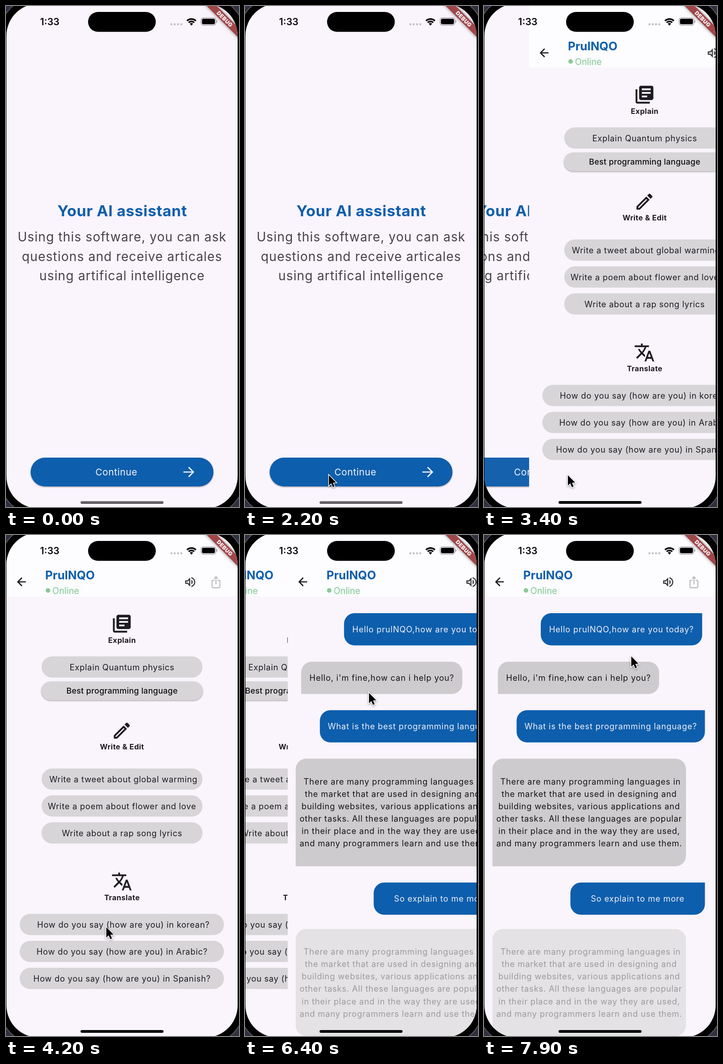
Write an HTML page with a canvas that moves like this. It is 511 px wide and 1096 px high and loops after 8 s.

```html
<!DOCTYPE html>
<html lang="en">
<head>
<meta charset="utf-8">
<title>AI assistant app</title>
<style>
html, body { margin: 0; width: 100%; height: 100%; overflow: hidden; background: #000; }
canvas { display: block; width: 511px; height: 1096px; }
</style>
</head>
<body>
<canvas id="stage"></canvas>
<script>
const W = 511, H = 1096, LOOP = 8000, PAGE_W = 508;
const BLUE = '#0d5eac', INK = '#1d1b20', BG = '#faf4fc', PILL = '#d7d5d8', BUBBLE = '#cdcbcd';
const BOT = 'PrulNQO';

const canvas = document.getElementById('stage');
const ctx = canvas.getContext('2d');
const dpr = window.devicePixelRatio || 1;
canvas.width = W * dpr;
canvas.height = H * dpr;

const icons = {
  books: 'M4 6H2v14c0 1.1.9 2 2 2h14v-2H4V6zm16-4H8c-1.1 0-2 .9-2 2v12c0 1.1.9 2 2 2h12c1.1 0 2-.9 2-2V4c0-1.1-.9-2-2-2zm-1 9H9V9h10v2zm-4 4H9v-2h6v2zm4-8H9V5h10v2z',
  edit: 'M14.06 9.02l.92.92L5.92 19H5v-.92l9.06-9.06M17.66 3c-.25 0-.51.1-.7.29l-1.83 1.83 3.75 3.75 1.83-1.83c.39-.39.39-1.02 0-1.41l-2.34-2.34c-.2-.2-.45-.29-.71-.29zm-3.6 3.19L3 17.25V21h3.75L17.81 9.94l-3.75-3.75z',
  translate: 'M12.87 15.07l-2.54-2.51.03-.03c1.74-1.94 2.98-4.17 3.71-6.53H17V4h-7V2H8v2H1v1.99h11.17C11.5 7.92 10.44 9.75 9 11.35 8.07 10.32 7.3 9.19 6.69 8h-2c.73 1.63 1.73 3.17 2.98 4.56l-5.09 5.02L4 19l5-5 3.11 3.11.76-2.04zM18.5 10h-2L12 22h2l1.12-3h4.75L21 22h2l-4.5-12zm-2.62 7l1.62-4.33L19.12 17h-3.24z',
  volume: 'M3 9v6h4l5 5V4L7 9H3zm7-.17v6.34L7.83 13H5v-2h2.83L10 8.83zM16.5 12c0-1.77-1.02-3.29-2.5-4.03v8.05c1.48-.73 2.5-2.25 2.5-4.02zM14 3.23v2.06c2.89.86 5 3.54 5 6.71s-2.11 5.85-5 6.71v2.06c4.01-.91 7-4.49 7-8.77s-2.99-7.86-7-8.77z',
  share: 'M16 5l-1.42 1.42-1.59-1.59V16h-1.98V4.83L9.42 6.42 8 5l4-4 4 4zm4 5v11c0 1.1-.9 2-2 2H6c-1.11 0-2-.9-2-2V10c0-1.11.89-2 2-2h3v2H6v11h12V10h-3V8h3c1.1 0 2 .89 2 2z'
};
for (const name in icons) icons[name] = new Path2D(icons[name]);

function cubic(x0, y0, x1, y1, x2, y2, x3, y3) {
  const at = (a, b, c, d, s) => {
    const r = 1 - s;
    return a * r * r * r + 3 * b * s * r * r + 3 * c * s * s * r + d * s * s * s;
  };
  return x => {
    let lo = 0, hi = 1;
    for (let i = 0; i < 24; i++) {
      const mid = (lo + hi) / 2;
      if (at(x0, x1, x2, x3, mid) < x) lo = mid; else hi = mid;
    }
    return at(y0, y1, y2, y3, lo);
  };
}
const fastIn = cubic(0, 0, 0.056, 0.024, 0.108, 0.3085, 0.198, 0.541);
const slowOut = cubic(0.198, 0.541, 0.3655, 1, 0.5465, 0.989, 1, 1);
const enterEase = x => x < 0.198 ? fastIn(x) : slowOut(x);
const leaveEase = cubic(0, 0, 0.35, 0.91, 0.33, 0.97, 1, 1);

function box(x, y, w, h, r, color) {
  ctx.beginPath();
  ctx.roundRect(x, y, w, h, r);
  ctx.fillStyle = color;
  ctx.fill();
}

function text(str, x, y, size, opt = {}) {
  ctx.font = `${opt.weight || 400} ${size}px Inter, Roboto, sans-serif`;
  ctx.letterSpacing = (opt.gap || 0) + 'px';
  ctx.textAlign = opt.align || 'center';
  ctx.fillStyle = opt.color || INK;
  ctx.fillText(str, x, y);
}

function line(color, width, ...pts) {
  ctx.beginPath();
  for (let i = 0; i < pts.length; i += 2) ctx.lineTo(pts[i], pts[i + 1]);
  ctx.strokeStyle = color;
  ctx.lineWidth = width;
  ctx.stroke();
}

function icon(name, x, y, scale, color) {
  ctx.save();
  ctx.translate(x, y);
  ctx.scale(scale, scale);
  ctx.translate(-12, -12);
  ctx.fillStyle = color;
  ctx.fill(icons[name], 'evenodd');
  ctx.restore();
}

function shadow(color, blur, dy) {
  ctx.shadowColor = color;
  ctx.shadowBlur = blur * dpr;
  ctx.shadowOffsetY = dy * dpr;
}
const noShadow = () => shadow('transparent', 0, 0);

function welcomePage(t) {
  text('Your AI assistant', 255, 460, 33.3, { weight: 700, gap: 0.6, color: BLUE });
  ['Using this software, you can ask', 'questions and receive articales', 'using artifical intelligence']
    .forEach((s, i) => text(s, 254.5, 515 + i * 42.5, 27.8, { gap: 1, color: '#47434b' }));
  shadow('rgba(0,0,0,.35)', 3, 1.5);
  box(54, 988, 401, 63, 31.5, t > 3150 ? '#1661ad' : BLUE);
  noShadow();
  text('Continue', 242, 1027, 20.7, { gap: 0.5, color: '#f4f4fa' });
  line('#f4f4fa', 2.7, 389, 1019.5, 411, 1019.5);
  line('#f4f4fa', 2.7, 400.5, 1009, 411, 1019.5, 400.5, 1030);
}

function header() {
  box(1, -5, PAGE_W, 140, 0, '#fdfcfe');
  line(INK, 2.6, 26, 102.5, 43.5, 102.5);
  line(INK, 2.6, 35, 93.5, 26, 102.5, 35, 111.5);
  text(BOT, 86, 97, 25.5, { weight: 700, align: 'left', color: BLUE });
  shadow('rgba(130,225,190,.35)', 9, 0);
  text('Online', 101.5, 129, 19.5, { align: 'left', color: '#8cc897' });
  noShadow();
  box(87, 116.2, 10, 10, 5, '#8cc897');
  icon('volume', 404, 103, 1.24, '#3b393f');
  icon('share', 460.5, 103, 1.22, '#c0bec3');
}

function pill(str, x, y, w, textX = 254.5) {
  box(x, y, w, 46.5, 23.25, PILL);
  text(str, textX, y + 30.5, 18.1, { gap: 0.65 });
}

function section(name, label, y, labelY) {
  icon(name, 254, y, 1.95, INK);
  text(label, 254.5, labelY, 16.2, { weight: 700, gap: 0.45 });
}

function topicsPage() {
  header();
  section('books', 'Explain', 194, 236);
  pill('Explain Quantum physics', 78, 265.5, 353);
  shadow('rgba(0,0,0,.35)', 3, 1.3);
  box(77.5, 320.5, 354, 41, 20.5, PILL);
  noShadow();
  text('Best programming language', 254.5, 347, 17.6, { weight: 500, gap: 0.28, color: '#0c0b0e' });

  section('edit', 'Write & Edit', 428, 469);
  pill('Write a tweet about global warming', 78, 510.7, 353, 257.5);
  pill('Write a poem about flower and love', 78, 569.6, 353);
  pill('Write about a rap song lyrics', 78, 628.5, 353);

  section('translate', 'Translate', 758, 799);
  ['korean', 'Arabic', 'Spanish'].forEach((lang, i) =>
    pill(`How do you say (how are you) in ${lang}?`, 30, 828.8 + i * 59, 448, i ? 254.5 : 257.5));
}

function bubble(x, y, w, h, mine, lines) {
  const r = 23;
  box(x, y, w, h, mine ? [r, 0, r, r] : [r, r, r, 0], mine ? BLUE : BUBBLE);
  const first = y + h / 2 + 6.5 - (lines.length - 1) * 13.6;
  lines.forEach((s, i) => text(s, x + w / 2, first + i * 27.15, 18,
    { gap: 0.78, color: mine ? '#eef1f8' : '#141316' }));
}

const answer = [
  ' There are many programming languages in',
  'the market that are used in designing and',
  'building websites, various applications and',
  'other tasks. All these languages are popular',
  'in their place and in the way they are used,',
  'and many programmers learn and use them.'
];

function fadedAnswer() {
  box(18.5, 862, 424.5, 234, 23, '#e4e2e4');
  answer.forEach((s, i) => text(s, 230.8, 918 + i * 27.15, 18, { gap: 0.78, color: '#9b999c' }));
}

function chatPage() {
  header();
  bubble(124.5, 171, 354, 70.5, true, [`Hello ${BOT.replace('P', 'p')},how are you today?`]);
  bubble(30.5, 277.3, 353.5, 70.5, false, ["Hello, i'm fine,how can i help you?"]);
  bubble(71.5, 383.3, 413, 70.5, true, ['What is the best programming language?']);
  bubble(18.5, 489.3, 424.5, 235.5, false, answer);
  bubble(189.5, 760.3, 295, 70.5, true, ['So explain to me more']);
  fadedAnswer();
}

const pages = [welcomePage, topicsPage, chatPage];
const pushes = [3235, 6231];

function drawPage(i, x, t) {
  ctx.save();
  ctx.translate(x, 0);
  box(1, -5, PAGE_W, H + 5, 0, BG);
  pages[i](t);
  ctx.restore();
}

function drawPages(t) {
  const top = pushes.filter(p => t >= p).length;
  const age = top ? (t - pushes[top - 1]) / 500 : 1;
  if (age >= 1) return drawPage(top, 0, t);
  drawPage(top - 1, -leaveEase(age) * PAGE_W / 3, t);
  drawPage(top, (1 - enterEase(age)) * PAGE_W, t);
}

function statusBar() {
  text('1:33', 96, 42, 21, { weight: 600, color: '#08070a' });
  box(180, 13, 148.5, 43.5, 21.75, '#000');
  for (let i = 0; i < 4; i++) box(360.5 + i * 7.2, 37.8, 4.6, 4.6, 2.3, '#c3bec6');
  ctx.strokeStyle = ctx.fillStyle = '#000';
  ctx.lineWidth = 3.5;
  for (const r of [13.8, 8.6]) {
    ctx.beginPath();
    ctx.arc(406.7, 42.3, r, -Math.PI * 0.75, -Math.PI * 0.25);
    ctx.stroke();
  }
  ctx.beginPath();
  ctx.moveTo(406.7, 43);
  ctx.arc(406.7, 42.3, 5, -Math.PI * 0.75, -Math.PI * 0.25);
  ctx.fill();
  ctx.beginPath();
  ctx.roundRect(427.8, 25.6, 32.4, 16.6, 5);
  ctx.strokeStyle = '#a39ea6';
  ctx.lineWidth = 1.4;
  ctx.stroke();
  box(429.8, 27.7, 28.4, 12.4, 3.3, '#000');
  box(461.5, 31, 2, 6, [0, 2, 2, 0], '#a39ea6');
}

function debugBanner() {
  ctx.save();
  ctx.translate(510.5, -3);
  ctx.rotate(Math.PI / 4);
  shadow('rgba(0,0,0,.5)', 7, 0);
  box(-56, 36.2, 112, 15.5, 0, '#a14648');
  noShadow();
  text('DEBUG', 0.5, 48.4, 12, { weight: 900, gap: 0.4, color: '#fbf4f6' });
  ctx.restore();
}

function homeBar(t) {
  let color = '#000';
  if (t < pushes[0]) {
    color = ctx.createLinearGradient(0, 1083, 0, 1089);
    color.addColorStop(0, '#837f87');
    color.addColorStop(1, '#48444c');
  }
  box(163.5, 1083, 182, 6, 3, color);
}

// time, x, y
const track = [
  [1000, -16, 1012], [1700, 183, 1025], [3550, 183, 1025], [4200, 219, 857], [4400, 233, 770],
  [5300, 269, 482], [5700, 271, 344], [7000, 271, 344], [7600, 322, 264], [LOOP, 322, 264]
];

function cursor(t) {
  const i = track.findIndex(k => k[0] > t);
  if (i < 1) return;
  const [t0, x0, y0] = track[i - 1], [t1, x1, y1] = track[i];
  const k = (t - t0) / (t1 - t0);
  ctx.save();
  ctx.translate(x0 + (x1 - x0) * k + 1, y0 + (y1 - y0) * k + 1.5);
  ctx.beginPath();
  [[0, 0], [0, 22.5], [5.1, 17.8], [8.7, 26], [12.4, 24.4], [8.9, 16.4], [15.8, 16]]
    .forEach(p => ctx.lineTo(...p));
  ctx.closePath();
  ctx.lineWidth = 2.8;
  ctx.strokeStyle = '#fff';
  shadow('rgba(0,0,0,.4)', 4, 1.5);
  ctx.stroke();
  noShadow();
  ctx.fillStyle = '#000';
  ctx.fill();
  ctx.restore();
}

function draw(t) {
  ctx.setTransform(dpr, 0, 0, dpr, 0, 0);
  box(0, 0, W, H, 0, '#30313f');
  box(-15, -21, 539, 1136, 84, '#55545d');
  box(-13, -19, 535, 1132, 82, '#000');
  ctx.save();
  ctx.beginPath();
  ctx.roundRect(1, -5, 507, 1104, 70);
  ctx.clip();
  drawPages(t);
  statusBar();
  debugBanner();
  homeBar(t);
  ctx.restore();
  cursor(t);
}

const start = performance.now();
function tick() {
  draw((performance.now() - start) % LOOP);
  requestAnimationFrame(tick);
}
tick();
</script>
</body>
</html>
```
